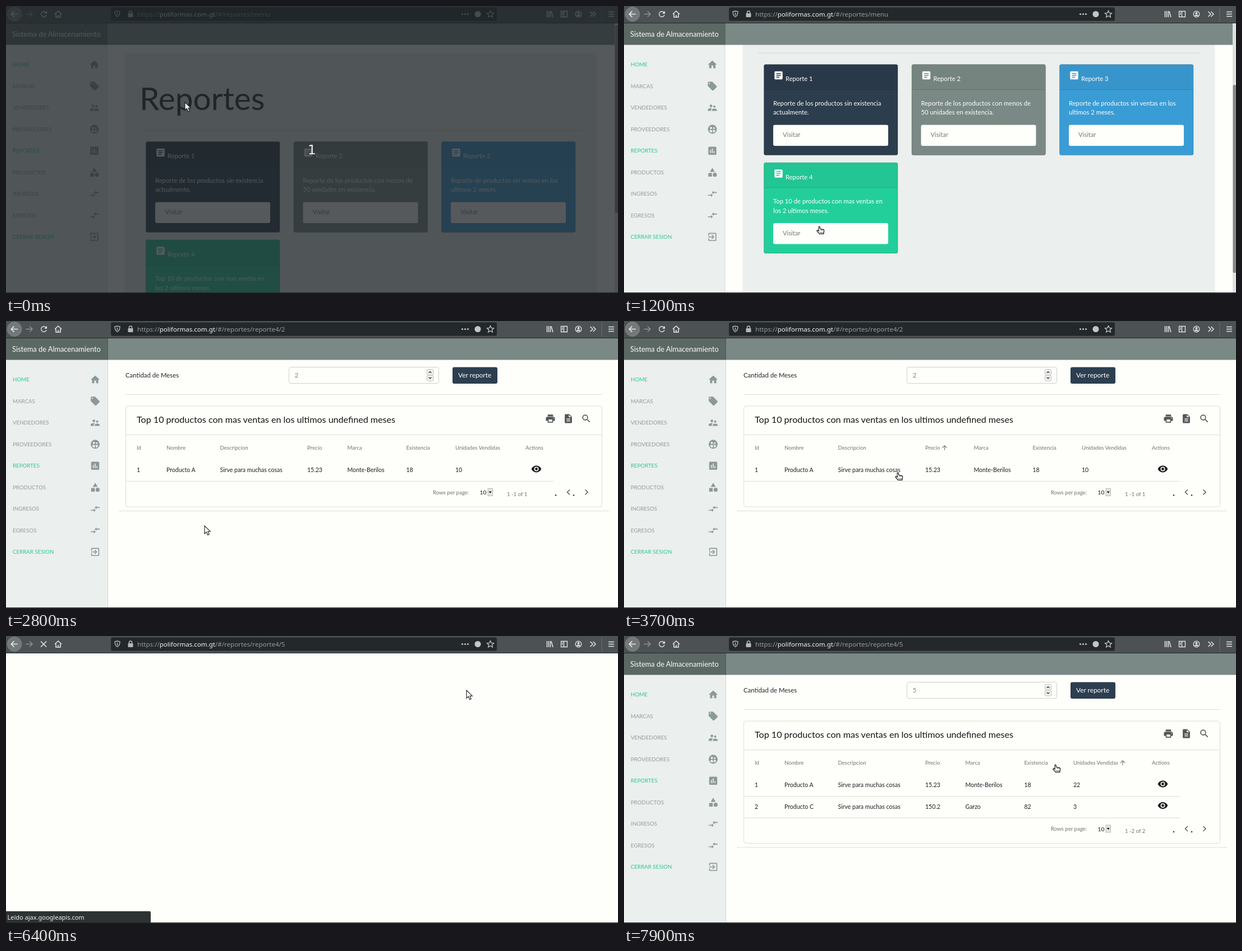
Animation, 1091 px wide and 513 px high, one loop 8000 ms. Source, as an HTML page:

```html
<!DOCTYPE html>
<html lang="es">
<head>
<meta charset="utf-8">
<title>Sistema de Almacenamiento</title>
<style>
html, body { margin: 0; width: 100%; height: 100%; overflow: hidden; background: #fefefa; }
svg { display: block; width: 100%; height: 100%; }
text { font-family: Lato, sans-serif; white-space: pre; }
.ui { font-family: "Noto Sans", sans-serif; }
</style>
</head>
<body>
<svg id="stage" viewBox="0 0 1091 513"></svg>
<script>
const LOOP = 8000, STEP = 100, ROW = 38.5;
const stage = document.getElementById('stage');

const C = {
  page: '#fefefa', panel: '#ebefed', line: '#dcdfdb', bar: '#dbdcda', ink: '#212529',
  muted: '#6f7674', icon: '#8b9a98', green: '#2cc798', head: '#7a8986', brand: '#5b6864',
  tool: '#4c5153', field: '#23282a', light: '#e4e7e6', navy: '#2c3e50'
};

const SQUARE = 'M19 3H5c-1.1 0-2 .9-2 2v14c0 1.1.9 2 2 2h14c1.1 0 2-.9 2-2V5c0-1.1-.9-2-2-2z';
const ICON = {
  home: 'M10 20v-6h4v6h5v-8h3L12 3 2 12h3v8z',
  tag: 'M21.4 11.6l-9-9C12 2.2 11.5 2 11 2H4c-1.1 0-2 .9-2 2v7c0 .5.2 1 .6 1.4l9 9c.8.8 2 .8 2.8 0l7-7c.8-.8.8-2 0-2.8zM5.5 7a1.5 1.5 0 1 1 0-3 1.5 1.5 0 0 1 0 3z',
  people: 'M16.5 12a2.5 2.5 0 1 0 0-5 2.5 2.5 0 0 0 0 5zM9 11a3 3 0 1 0 0-6 3 3 0 0 0 0 6zm7.5 3c-1.8 0-5.5.9-5.5 2.8V19h11v-2.2c0-1.9-3.7-2.8-5.5-2.8zM9 13c-2.3 0-7 1.2-7 3.5V19h7v-2.2c0-.9.3-2.4 2.4-3.5-.9-.2-1.7-.3-2.4-.3z',
  group: 'M12 2a10 10 0 1 0 0 20 10 10 0 0 0 0-20zM9 6.5a2.5 2.5 0 1 1 0 5 2.5 2.5 0 0 1 0-5zm6.5 1a2 2 0 1 1 0 4 2 2 0 0 1 0-4zM5 15.5c1.500-2.600 6-2.600 7 0l-1.500 4.300c-2.500-.3-4.700-2-5.500-4.300zm8.500 4.200v-4c-.1-.8-.4-1.300-.8-1.800 2-1 5.300-.4 6 1.500-1 2.400-2.800 3.900-5.200 4.300z',
  chart: SQUARE + 'M9 17H7v-7h2zm4 0h-2V7h2zm4 0h-2v-4h2z',
  shapes: 'M12 2l-5.500 9h11zM17.500 13a4.500 4.500 0 1 0 0 9 4.500 4.500 0 0 0 0-9zM3 13.500h8v8H3z',
  swap: 'M9 14H2v2h7v3l4-4-4-4zm6-1v-3h7V8h-7V5l-4 4z',
  exit: 'M10.100 15.600L11.500 17l5-5-5-5-1.400 1.400 2.600 2.600H3v2h9.700zM19 3H5c-1.100 0-2 .9-2 2v4h2V5h14v14H5v-4H3v4c0 1.100.9 2 2 2h14c1.100 0 2-.9 2-2V5c0-1.100-.9-2-2-2z',
  article: SQUARE + 'M14 17H7v-2h7zm3-4H7v-2h10zm0-4H7V7h10z',
  print: 'M19 8H5c-1.700 0-3 1.300-3 3v6h4v4h12v-4h4v-6c0-1.700-1.300-3-3-3zm-3 11H8v-5h8zm3-7a1 1 0 1 1 0-2 1 1 0 0 1 0 2zM18 3H6v4h12z',
  file: 'M14 2H6c-1.100 0-2 .9-2 2v16c0 1.100.9 2 2 2h12c1.100 0 2-.9 2-2V8zm2 16H8v-2h8zm0-4H8v-2h8zm-3-5V3.500L18.500 9z',
  search: 'M15.500 14h-.8l-.3-.3A6.500 6.500 0 1 0 9.500 16c1.600 0 3.100-.6 4.200-1.600l.3.3v.8l5 5 1.500-1.500zm-6 0a4.500 4.500 0 1 1 0-9 4.500 4.500 0 0 1 0 9z',
  eye: 'M12 4.500C7 4.500 2.700 7.600 1 12c1.700 4.400 6 7.500 11 7.500s9.300-3.100 11-7.500c-1.700-4.400-6-7.500-11-7.500zM12 17a5 5 0 1 1 0-10 5 5 0 0 1 0 10zm0-8a3 3 0 1 0 0 6 3 3 0 0 0 0-6z',
  up: 'M4 12l1.400 1.400L11 7.800V20h2V7.800l5.600 5.600L20 12l-8-8z',
  reload: 'M17.700 6.300A8 8 0 1 0 19.700 14h-2.100A6 6 0 1 1 16.200 7.800L13 11h7V4z'
};

// drawing helpers
const rect = (x, y, w, h, fill, extra = '') =>
  `<rect x="${x}" y="${y}" width="${w}" height="${h}" fill="${fill}" ${extra}/>`;
const hline = (x1, x2, y, color = C.line) => rect(x1, y - .5, x2 - x1, 1, color);
const text = (x, y, size, fill, str, extra = '') =>
  `<text x="${x}" y="${y}" font-size="${size}" fill="${fill}" ${extra}>${str}</text>`;
const icon = (name, cx, cy, fill, size = 19.2) =>
  `<path transform="translate(${cx - size / 2} ${cy - size / 2}) scale(${size / 24})" fill-rule="evenodd" fill="${fill}" d="${ICON[name]}"/>`;
const stroke = (d, color, w = 1.5, extra = '') =>
  `<path d="${d}" fill="none" stroke="${color}" stroke-width="${w}" ${extra}/>`;
const group = (dx, dy, body, extra = '') => `<g transform="translate(${dx} ${dy})" ${extra}>${body}</g>`;

// timeline helpers: last value reached, and linear blend between keys
const hold = (t, keys) => keys.filter(k => k[0] <= t).pop()[1];
function blend(t, keys) {
  const i = keys.findIndex(k => k[0] > t);
  if (i < 0) return keys[keys.length - 1].slice(1);
  const [a, b] = [keys[i - 1], keys[i]], p = (t - a[0]) / (b[0] - a[0]);
  return a.slice(1).map((v, n) => v + (b[n + 1] - v) * p);
}

const SCROLL = [[0, 0], [300, 0], [400, 18], [500, 55], [600, 100], [700, 130], [800, 138]];
const POINTER = [
  [0, 319, 172], [300, 319, 172], [400, 322, 176], [800, 322, 176], [1200, 347, 394],
  [2300, 347, 394], [2600, 347, 378], [2700, 347, 378], [2900, 361, 354], [3000, 361, 354],
  [3700, 487, 271], [3900, 517, 184], [4700, 755, 92], [5300, 755, 92], [5600, 782, 95],
  [5900, 821, 97], [7300, 821, 97], [7900, 768, 230]
];
const SHAPE = [
  [0, 'arrow'], [400, 'beam'], [900, 'arrow'], [1200, 'hand'], [1600, 'arrow'], [3500, 'hand'],
  [3900, 'arrow'], [4400, 'beam'], [4600, 'arrow'], [5500, 'hand'], [6200, 'arrow'],
  [7200, 'hand'], [7500, 'arrow'], [7800, 'hand']
];
const VIEW = [[0, 'menu'], [1600, 'loading'], [1900, 'report'], [6200, 'blank'], [6600, 'report']];
const PATH = [[0, 'menu'], [1600, 'reporte4/2'], [6100, 'reporte4/5']];

const CURSOR = {
  arrow: '<path d="M0 0v14.200l3.300-3 2.400 5.300 2.500-1.100-2.300-5.200h4.300z" fill="#fff" stroke="#15181a" stroke-width="1.100"/>',
  hand: '<path d="M.2.500C1.600-.3 2.300.8 2.400 2l.4 2.600 5 .8c1.500.3 2 1.200 1.800 2.600l-.8 5.300H1.700L-3 8.300c-.6-1.200.6-2 1.600-1.300L.2 8.200z" fill="#fff" stroke="#15181a" stroke-width="1.200"/>' +
    stroke('M4.500 5v2.500M6.800 5.500v2M1.700 11h7', '#15181a', .8),
  beam: stroke('M-2.500-6q2.500 0 2.500 1.500V4.500q0 1.500-2.500 1.500M2.500-6q-2.500 0-2.500 1.500M0 4.500q0 1.500 2.500 1.500', '#15181a', 1.500)
};

function toolbar(path, busy) {
  const dim = '#8d9294', c = C.light;
  return rect(0, 0, 1091, 30.5, C.tool) + rect(0, 30, 1091, 1, '#25292a') +
    `<circle cx="15" cy="14.500" r="12.800" fill="#737879" stroke="#8b8f90" stroke-width=".8"/>` +
    stroke('M21 14.500H9.500M14.500 9.300l-5.200 5.200 5.200 5.200', c, 1.700) +
    stroke('M35.500 14.500H47M42 9.500l5 5-5 5', dim, 1.500) +
    (busy ? stroke('M62 9.500l10 10M72 9.500l-10 10', c, 1.600) : icon('reload', 67.500, 14.500, c, 16.500)) +
    stroke('M87 14.500l6-5.500 6 5.500M89 14v6h8v-6M93 20v-4', c, 1.600) +
    rect(187, 2.500, 688, 24, C.field, 'rx="3"') +
    stroke('M194 10l4.500-1 4.500 1c0 5-1 7.500-4.500 9.500-3.500-2-4.500-4.500-4.500-9.500zM198.500 11.500v5.500', '#b4b8b9', 1.400) +
    rect(217.500, 13, 9, 7, '#b4b8b9', 'rx="1"') + stroke('M219.500 13.500v-2q0-2.500 2.500-2.500t2.500 2.500v2', '#b4b8b9') +
    text(234, 18.500, 11.540, '#979c9d',
      `https://<tspan fill="#f4f6f5">poliformas.com.gt</tspan>/#/reportes/${path}`, 'class="ui"') +
    [813.500, 818.500, 823.500].map(x => `<circle cx="${x}" cy="14.500" r="1.600" fill="#c3c6c6"/>`).join('') +
    `<circle cx="841" cy="14.500" r="5.500" fill="#c3c6c6"/>` +
    stroke('M863.500 8.500l1.800 4 4.200.4-3.200 2.800 1 4.300-3.800-2.300-3.800 2.300 1-4.300-3.200-2.800 4.200-.4z', '#c3c6c6', 1.300) +
    stroke('M964.500 9v11M967.500 9v11M970.500 9v11M972 9.500l3 10.500', c) +
    stroke('M989.500 9.500h11v10h-11zM994.500 9.500v10M991 12.500h2M991 15h2', c, 1.300) +
    `<circle cx="1020.500" cy="14.500" r="5.300" fill="none" stroke="${c}" stroke-width="1.300"/><circle cx="1020.500" cy="12.800" r="2" fill="${c}"/>` +
    rect(1017.500, 15.500, 6, 2.500, c, 'rx="1.200"') +
    stroke('M1041.500 10l4.500 4.500-4.500 4.500M1046.500 10l4.500 4.500-4.500 4.500', c) +
    rect(1061.500, 2, 1, 26, '#6b7071') + stroke('M1074 10.500h10M1074 14.500h10M1074 18.500h10', c);
}

const NAV = [
  ['HOME', 'home'], ['MARCAS', 'tag'], ['VENDEDORES', 'people'], ['PROVEEDORES', 'group'],
  ['REPORTES', 'chart'], ['PRODUCTOS', 'shapes'], ['INGRESOS', 'swap'], ['EGRESOS', 'swap'],
  ['CERRAR SESION', 'exit']
];
function frame(wide) {
  const w = wide ? 181.500 : 180;
  return rect(0, 69, w, 444, C.panel) + rect(w - .5, 69, 1, 444, '#d3d9d6') +
    rect(w, 31, 1091 - w, 38.500, C.head) + rect(0, 31, w, 38.500, C.brand) +
    rect(w - .5, 31, 1, 38.500, '#4f5a57') +
    text(11, 54.500, 12.800, '#fbfcfa', 'Sistema de Almacenamiento') +
    NAV.map(([label, name], i) => {
      const y = 104.800 + i * ROW;
      return text(12, y + 3.500, 9.700, i % 4 ? '#919e9c' : C.green, label) +
        icon(name, wide ? 159 : 157.500, y, C.icon);
    }).join('');
}

const scrollbar = s => rect(1085, 31, 6, 482, '#dfe1de') + rect(1085.500, 34 + s * .775, 5.500, 336, '#858a89', 'rx="2"');

const CARDS = [
  [249, 242, '#2c3d4d', '#293949', ['Reporte de los productos sin existencia', 'actualmente.']],
  [512.500, 242, '#7a8985', '#76847f', ['Reporte de los productos con menos de', '50 unidades en existencia.']],
  [776, 242, '#3a9cd5', '#3895cc', ['Reporte de productos sin ventas en los', 'ultimos 2 meses.']],
  [249, 417.500, '#22cf9a', '#22c593', ['Top 10 de productos con mas ventas en', 'los 2 ultimos meses.']]
];
function card([x, y, body, top, lines], i) {
  return group(x, y,
    rect(.5, .5, 238.500, 162, body, 'rx="3" stroke="#000" stroke-opacity=".22"') +
    rect(1, 1, 237.500, 44, top, 'rx="2"') + rect(1, 45, 237.500, 1, '#000', 'opacity=".16"') +
    icon('article', 26.500, 20, '#fff') + text(39, 30, 11.200, '#fff', `Reporte ${i + 1}`) +
    lines.map((s, n) => text(17, 73.500 + n * 16.800, 11.250, '#fff', s)).join('') +
    rect(17, 108.500, 205, 37.500, C.page, 'rx="3"') + text(34, 130, 11.200, '#737a78', 'Visitar'));
}
const menu = s => group(0, -s,
  rect(211.500, 83.500, 842, 620, C.panel, 'rx="4"') +
  text(238, 186, 56.800, C.ink, 'Reportes') + hline(238, 1028, 222, '#d3d8d5') + CARDS.map(card).join(''));

const HEADS = ['Id', 'Nombre', 'Descripcion', 'Precio', 'Marca', 'Existencia', 'Unidades Vendidas', 'Actions'];
const heads = (xs, y) => HEADS.map((s, i) => text(xs[i], y, 9.650, C.muted, s)).join('');

function loading() {
  let out = rect(211.500, 69, 1, 444, C.line) + rect(1052.500, 69, 1, 444, C.line) +
    heads([231, 284, 363, 458, 530, 601, 688, 813], 92);
  for (let i = 0; i < 10; i++) {
    const y = 130.300 + i * ROW;
    if (i === 7) out += rect(212, y - 19, 556, ROW, '#ecede9');
    out += rect(232, y - 6, 525, 12, C.bar, 'rx="3"') + hline(212, 768, y + 19.300);
  }
  return out + rect(849, 509.500, 9, 1.500, '#777') + stroke('M996 510l-4 3M1022 510l4 3', '#555');
}

const PRODUCTS = [
  ['1', 'Producto A', 'Sirve para muchas cosas', '15.23', 'Monte-Berilos', '18'],
  ['2', 'Producto C', 'Sirve para muchas cosas', '150.2', 'Garzo', '82']
];

function report({ value, focus, sold, sort, hover, press }) {
  const shift = i => sort && i > sort ? 15 : 0;
  const xs = [233, 286, 381.500, 537, 608.500, 713.500, 801, 926].map((x, i) => x + shift(i));
  const end = sort ? 992 : 976, n = sold.length, drop = (n - 1) * ROW;
  let out = text(213, 100.500, 11.350, C.ink, 'Cantidad de Meses') +
    (focus ? rect(503, 81, 270, 32, 'none', 'rx="5" stroke="#b9c5d0" stroke-width="3"') : '') +
    rect(504.500, 82.500, 267, 29, C.page, `rx="3" stroke="${focus ? '#5f7890' : '#cdd2d0'}"`) +
    text(514.500, 101, 12, '#7b8a88', value) + (focus ? rect(522, 91, 1, 13, '#555c5c') : '') +
    rect(750.500, 86.500, 11, 10, '#f6f7f4', 'rx="2" stroke="#b9bcb9"') +
    rect(750.500, 97, 11, 10, '#f6f7f4', 'rx="2" stroke="#b9bcb9"') +
    stroke('M753.500 93l2.500-2.500 2.500 2.500M753.500 100.500l2.500 2.500 2.500-2.500', '#333', 1.300) +
    rect(796, 82.500, 80, 29.500, press ? '#1e2b37' : C.navy, 'rx="3"') +
    text(806, 101, 11.900, '#fff', 'Ver reporte') +
    hline(213, 1063, 131.500) +
    rect(213.500, 152, 849, 180 + drop, C.page, `rx="4" stroke="${C.line}"`) +
    text(233, 182, 16.100, '#111516', 'Top 10 productos con mas ventas en los ultimos undefined meses') +
    icon('print', 970.500, 174.500, '#515756') + icon('file', 1002.500, 174.500, '#515756') +
    icon('search', 1034.500, 174.500, '#515756') + hline(214, 1062, 203.500) + heads(xs, 229.500);
  if (sort) out += icon('up', sort === 3 ? 571.500 : 889, 226.500, C.muted, 13.500);
  sold.forEach((count, r) => {
    const y = r * ROW;
    if (hover && !r) out += rect(214, 247.500, end - 214, ROW, '#ecede9');
    out += [...PRODUCTS[r], count].map((s, i) => text(xs[i], 270 + y, 10.500, '#1c2022', s)).join('') +
      icon('eye', xs[7] + 19.500, 264.500 + y, '#1a1d1e') + hline(214, end, 286.500 + y);
  });
  return out + group(0, drop,
    text(761, 309.500, 9.650, C.muted, 'Rows per page:') + text(844.500, 310, 10.200, '#111', '10') +
    rect(859, 299.500, 8.500, 13, '#e6e7e4', 'stroke="#aaa" stroke-width=".8"') +
    '<path d="M860.500 304.500h5.500l-2.700 3.500z" fill="#222"/>' +
    text(893, 313, 9.650, C.muted, `1 -${n} of ${n}`) +
    `<circle cx="980" cy="311.500" r="1.300" fill="#333"/><circle cx="1012" cy="311.500" r="1.300" fill="#333"/>` +
    stroke('M1005 301.500l-4.500 4.500 4.500 4.500M1032.500 301.500l4.500 4.500-4.500 4.500', '#5b6160', 1.600) +
    hline(201, 1075, 339.500));
}

const status = (str, w, alpha) => alpha
  ? group(0, 0, rect(-3, 492, w + 3, 24, '#2e3233', 'rx="2"') + text(2.500, 506.500, 11, '#f4f5f3', str, 'class="ui"'), `opacity="${alpha}"`)
  : '';

function scene(t) {
  const view = hold(t, VIEW), path = hold(t, PATH), late = t >= 6600;
  const wide = view === 'report', [s] = blend(t, SCROLL), [px, py] = blend(t, POINTER);
  let out = rect(0, 0, 1091, 513, C.page);

  if (view === 'menu') out += menu(s);
  if (view === 'loading') out += loading();
  if (wide) out += report({
    value: hold(t, [[0, 2], [4900, 3], [5000, 4], [5100, 5]]),
    focus: t >= 4600 && t < 5900,
    sold: late ? ['22', '3'] : ['10'],
    sort: hold(t, [[0, 0], [3700, 3], [3900, 0], [7800, 6]]),
    hover: t === 3600,
    press: t >= 5800 && t < 6200 || t >= 7200 && t < 7500
  });
  if (view !== 'blank') out += frame(wide);
  if (view === 'menu' || view === 'loading') out += scrollbar(s);

  out += toolbar(path, t >= 6200 && t < 7100) +
    status('https://poliformas.com.gt/#/reportes/reporte4/2', 257,
      hold(t, [[0, 0], [1300, 1], [1800, .72], [1900, .35], [2000, 0]])) +
    status('Leído ajax.googleapis.com', 258, hold(t, [[0, 0], [6300, 1], [6700, 0]])) +
    rect(0, 512, 1091, 1, '#25292a');
  if (t < 100) out += rect(0, 0, 1091, 513, 'rgb(32,38,42)', 'opacity=".76"') +
    text(538, 265, 23, '#eef0ef', '1', 'style="font-family:\'DejaVu Sans\',sans-serif"');
  return out + group(px, py, CURSOR[hold(t, SHAPE)]);
}

let shown = -1;
function tick(now) {
  const t = Math.floor(now % LOOP / STEP) * STEP;
  if (t !== shown) stage.innerHTML = scene(shown = t);
  requestAnimationFrame(tick);
}
tick(0);
</script>
</body>
</html>
```
